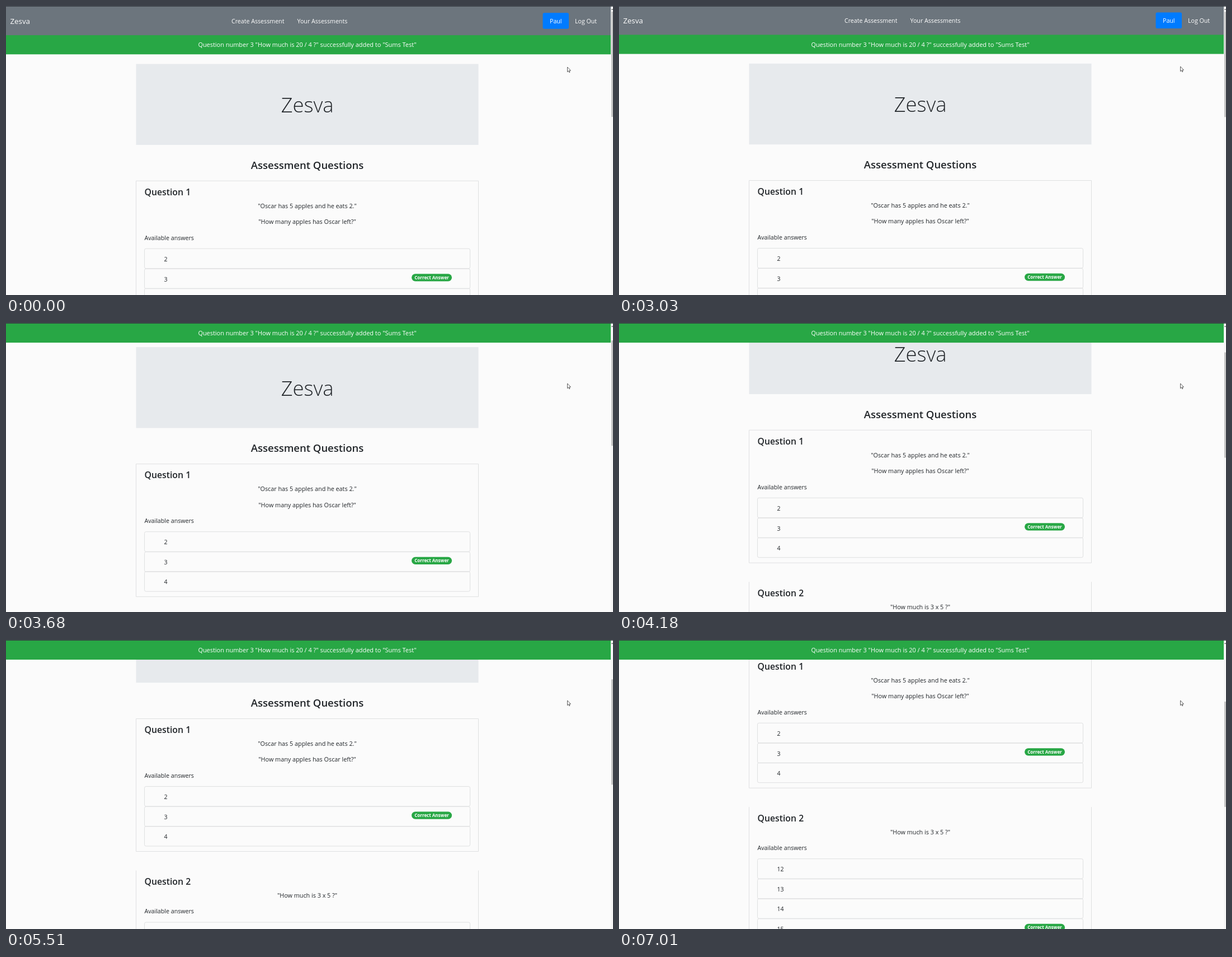
Animation of 1085x516 px, one loop 8 s. Source, as an HTML page:

```html
<!DOCTYPE html>
<html lang="en">
<head>
<meta charset="utf-8">
<title>Assessment Questions</title>
<style>
  html, body { margin: 0; width: 100%; height: 100%; overflow: hidden; background: #fbfbfb; }
  svg { display: block; font: 10.65px "Open Sans", "Noto Sans", sans-serif; fill: #212529; }
  .line { fill: none; stroke: #dfe0e1; }
  .mid { text-anchor: middle; }
  .white { fill: #fff; }
  .green { fill: #28a745; }
  .head { font-weight: 600; }
</style>
</head>
<body>
<svg width="1085" height="516" viewBox="0 0 1085 516">
  <g id="page"></g>
  <g id="banner">
    <rect class="green" width="1081" height="34.2"/>
    <text class="white mid" x="538.5" y="21.4" font-size="10.95">Question number 3 "How much is 20 / 4 ?" successfully added to "Sums Test"</text>
  </g>
  <rect x="1081" width="4" height="516" fill="#f5f5f5"/>
  <path d="M1082 7l1.5-2 1.5 2z" fill="#505050"/>
  <rect id="thumb" x="1082" y="10" width="3" height="188" fill="#c3c3c3"/>
  <rect width="1085" height="1" fill="#363c41"/>
  <path id="cursor" d="M.5 .5V9.2L2.5 7.4 3.8 10.2 5 9.6 3.8 6.9 6.4 6.7Z" fill="#fff" stroke="#333" stroke-width=".8"/>
</svg>
<script>
const $ = id => document.getElementById(id);
const CENTER = 538.5, LOOP = 8000;

const text = (x, y, s, cls = '', size = 10.65, weight = '') =>
  `<text x="${x}" y="${y}" class="${cls}" style="font-size:${size}px;${weight && 'font-weight:' + weight}">${s}</text>`;

function answer(y, label, correct) {
  const badge = correct
    ? `<rect class="green" x="725" y="${y + 9}" width="72" height="13.2" rx="6.6"/>` +
      text(761, y + 18.5, 'Correct Answer', 'white mid', 8, 700)
    : '';
  return `<rect class="line" x="247.5" y="${y}" width="582" height="35.5" rx="2.8"/>` +
    text(282.5, y + 22.3, label) + badge;
}

function question(y, number, lines, answers, correct) {
  const top = y + 121 - 28.5 * (2 - lines.length);
  const bottom = top + Math.round(answers.length * 35.6) + 9;
  const edge = number === 1 ? 'z' : '';
  return `<path class="line" d="M232.5 ${y}V${bottom}H844.5V${y}${edge}"/>` +
    text(247.5, y + 25.7, 'Question ' + number, 'head', 15.8) +
    lines.map((s, i) => text(CENTER, y + 48.4 + 28.5 * i, `"${s}"`, 'mid', 10.8)).join('') +
    text(247.5, top - 15.6, 'Available answers') +
    answers.map((a, i) => answer(top + Math.round(35.6 * i), a, i === correct)).join('');
}

$('page').innerHTML =
  '<rect width="1081" height="53" fill="#6c757d"/>' +
  text(7.5, 32, 'Zesva', 'white', 13.3) +
  text(403, 31, 'Create Assessment', 'white') +
  text(520.5, 31, 'Your Assessments', 'white') +
  '<rect x="959.5" y="12.2" width="46.5" height="28.6" rx="2.8" fill="#007bff"/>' +
  text(982.8, 31, 'Paul', 'white mid') +
  text(1017, 31, 'Log Out', 'white') +
  '<rect x="232.5" y="103.5" width="612" height="144.5" fill="#e7eaed"/>' +
  text(CENTER, 190, 'Zesva', 'mid', 36.5, 300) +
  text(CENTER, 290.5, 'Assessment Questions', 'mid head', 18.5) +
  question(312.2, 1, ['Oscar has 5 apples and he eats 2.', 'How many apples has Oscar left?'], [2, 3, 4], 1) +
  question(583.2, 2, ['How much is 3 x 5 ?'], [12, 13, 14, 15], 3);

// Each wheel notch scrolls 57px; pairs are [time, offset].
const scrolls = [
  [0, 0], [3030, .7], [3123, 24], [3217, 50], [3310, 57],
  [3680, 60.5], [3810, 105], [3950, 114],
  [4180, 121], [4290, 158], [4400, 171],
  [5510, 171.7], [5670, 218], [5790, 228],
  [6740, 228.7], [6890, 274], [7010, 285]
];

const start = performance.now();
function draw(now) {
  const t = Math.max(0, now - start) % LOOP;
  const y = scrolls.filter(s => s[0] <= t).pop()[1];
  $('page').setAttribute('transform', `translate(0 ${-y})`);
  $('banner').setAttribute('transform', `translate(0 ${Math.max(.9, 52.1 - y)})`);
  $('thumb').setAttribute('y', 10 + y * .351);
  $('cursor').setAttribute('transform', `translate(1003 ${t < 50 ? 108.5 : 107.5})`);
  requestAnimationFrame(draw);
}
draw(start);
</script>
</body>
</html>
```
